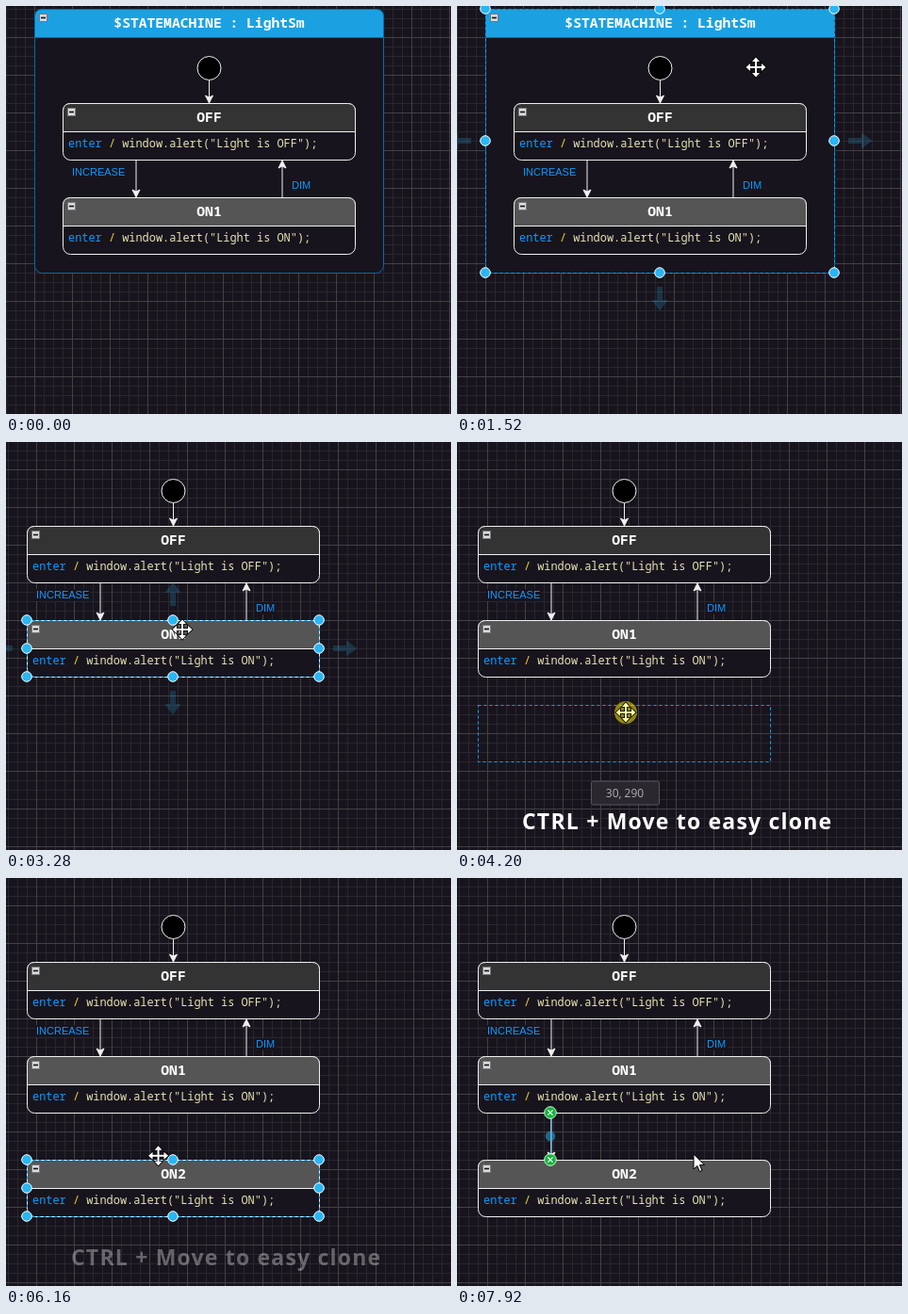
An HTML page for the animation above (8000 ms loop, 472 by 433 pixels).

```html
<!DOCTYPE html>
<html lang="en">
<head>
<meta charset="utf-8">
<title>State machine editor</title>
<style>
  html, body { margin: 0; width: 100%; height: 100%; overflow: hidden; background: #18141d; }
  svg { display: block; width: 472px; height: 433px; }
  text { white-space: pre; }
  .title { font: bold 14.67px "Noto Sans Mono", monospace; fill: #fff; text-anchor: middle; }
  .code { font: 11.92px "Noto Sans Mono", monospace; fill: #e6e3b4; }
  .event { font: 11px "Liberation Sans", sans-serif; fill: #0a9bff; }
  .hint { font: 12px "Open Sans", sans-serif; fill: #b0adb3; text-anchor: middle; }
  .caption { font: bold 23px "Open Sans", sans-serif; letter-spacing: 1.2px; fill: #fff; }
  .dash { fill: none; stroke: #00a8ff; stroke-dasharray: 3 3; }
  .glow { fill: none; stroke: #00a8ff; stroke-width: 5; opacity: .5; }
</style>
</head>
<body>
<svg id="stage" viewBox="0 0 472 433"></svg>
<script>
const LOOP = 8000, STEP = 40;
const BG = '#18141d', LINE = '#f0f0f0';
const SHIFT = [-38, -14];
const ON1 = [22, 189, 310, 60], ON2 = [22, 299, 310, 60], MACHINE = [30, 3, 370, 280];

// Pointer path: time, x, y
const PATH = [
  [480, 345, 400], [1200, 317, 65], [2400, 317, 65], [2840, 187, 199],
  [3720, 187, 199], [4200, 179, 287], [4320, 178, 294], [4640, 178, 294],
  [4680, 178, 296], [4960, 178, 296], [5080, 177, 306], [6000, 177, 306],
  [6560, 99, 249], [6720, 99, 249], [6880, 99, 285], [7000, 99, 301],
  [7440, 99, 301], [7920, 251, 293]
];

const box = ([x, y, w, h], attrs) =>
  `<rect x="${x + .5}" y="${y + .5}" width="${w}" height="${h}" ${attrs}/>`;

const foldIcon = (x, y) =>
  box([x, y, 8, 8], 'fill="#d9d9de" stroke="#77777c"') +
  `<path d="M${x + 2} ${y + 4.5}h5" stroke="#111" stroke-width="1.6"/>`;

// Rounded container with a 30 px header
function container([x, y, w, h], title, head, stroke) {
  const r = 8, top = `M${x + .5} ${y + 30.5}v${r - 30}q0 ${-r} ${r} ${-r}h${w - 2 * r}q${r} 0 ${r} ${r}v${30 - r}z`;
  return box([x, y, w, h], `rx="${r}" fill="${BG}" stroke="${stroke}"`) +
    `<path d="${top}" fill="${head}" stroke="${stroke}"/>` + foldIcon(x + 5, y + 5) +
    `<text class="title" x="${x + w / 2 + .5}" y="${y + 19.5}">${title}</text>`;
}

const state = (y, title, head, msg) =>
  container([60, y, 310, 60], title, head, LINE) +
  `<text class="code" x="66" y="${y + 47}"><tspan fill="#0a9bff">enter</tspan> ` +
  `<tspan fill="#e8dc2c">/</tspan> window.alert("${msg}");</text>`;

// Vertical arrow ending at y2
function arrow(x, y1, y2) {
  const s = Math.sign(y2 - y1);
  return `<path d="M${x} ${y1}V${y2 - 6 * s}M${x} ${y2}l-4 ${-8 * s}l4 ${2 * s}l4 ${-2 * s}z" fill="${LINE}" stroke="${LINE}"/>`;
}

const event = (x, y, w, name) =>
  `<rect x="${x - 1}" y="${y - 10}" width="${w}" height="13" fill="${BG}"/>` +
  `<text class="event" x="${x}" y="${y}">${name}</text>`;

function handles([x, y, w, h]) {
  let out = box([x, y, w, h], 'class="dash"');
  for (const i of [0, 1, 2]) for (const j of [0, 1, 2])
    if (i !== 1 || j !== 1)
      out += `<circle cx="${x + w * i / 2}" cy="${y + h * j / 2}" r="5.3" fill="#29b6f2" stroke="#fff"/>`;
  return out;
}

function hoverArrows([x, y, w, h]) {
  const cx = x + w / 2, cy = y + h / 2, gap = 15;
  return [[cx, y - gap, 0], [x + w + gap, cy, 90], [cx, y + h + gap, 180], [x - gap, cy, 270]]
    .map(([px, py, a]) => `<path transform="translate(${px} ${py}) rotate(${a})" ` +
      'd="M-3 0V-14H-8.5L0 -25.5L8.5 -14H3V0z" fill="#29b6f2" opacity=".2"/>').join('');
}

const endpoint = y =>
  `<circle cx="99" cy="${y}" r="6.3" fill="#12b53a" stroke="#d8f5de"/>` +
  `<path d="M96.4 ${y - 2.6}l5.2 5.2m0 -5.2l-5.2 5.2" stroke="#fff" stroke-width="1.3"/>`;

const gridLines = (p, color) => `<path d="M${p} 0V40M0 ${p}H40" stroke="${color}"/>`;

document.getElementById('stage').innerHTML = `
  <defs><pattern id="grid" width="40" height="40" patternUnits="userSpaceOnUse">
    ${[10.5, 20.5, 30.5].map(p => gridLines(p, '#29262e')).join('')}${gridLines(.5, '#424144')}
  </pattern></defs>
  <rect width="472" height="433" fill="${BG}"/>
  <rect width="472" height="433" fill="url(#grid)"/>
  <g id="machine">${container(MACHINE, '$STATEMACHINE : LightSm', '#1ba1e2', '#006eaf')}</g>
  <g id="diagram">
    <circle cx="215.5" cy="66" r="12.5" fill="#000" stroke="${LINE}"/>
    ${arrow(215.5, 79, 103)}
    ${state(103, 'OFF', '#333', 'Light is OFF')}
    ${state(203, 'ON1', '#555', 'Light is ON')}
    <g id="clone">${state(313, 'ON2', '#555', 'Light is ON')}</g>
    ${arrow(138, 164, 203)}${arrow(293, 203, 164)}
    ${event(70, 180, 59, 'INCREASE')}${event(303, 194, 23, 'DIM')}
  </g>
  <g id="machineHover">${hoverArrows(MACHINE)}</g>
  <g id="machineSel">${handles(MACHINE)}</g>
  <g id="on1Hover">${hoverArrows(ON1)}</g>
  <g id="on1Glow">${box(ON1, 'class="glow" rx="8"')}</g>
  <g id="on1Sel">${handles(ON1)}</g>
  <g id="on2Glow">${box(ON2, 'class="glow" rx="8"')}</g>
  <g id="edge"></g>
  <g id="on2Sel">${handles(ON2)}</g>
  <g id="edgeSel">
    <path d="M99.5 249V299" stroke="#5cc4ee"/>
    <circle cx="99" cy="274" r="5.3" fill="#29b6f2" opacity=".5"/>
    ${endpoint(249)}${endpoint(299)}
  </g>
  <g id="ghost">${box([22, 0, 310, 60], 'class="dash"')}</g>
  <g id="hint">${box([142, 0, 72, 25], 'rx="2" fill="#2a272f" stroke="#58555c"')}
    <text class="hint" id="hintText" x="178" y="17"></text></g>
  <text class="caption" id="caption" x="69" y="411">CTRL + Move to easy clone</text>
  <g id="pointer">
    <circle id="press" r="12" fill="#ffee00" opacity=".52"/>
    <path id="arrowShape" d="M0 0V16L3.8 12.5L6.4 18.5L9 17.4L6.4 11.6H11.5z" fill="#fff" stroke="#000"/>
    <path id="moveShape" d="M0 -10.5L4 -6H1V-1H6V-4L10.5 0L6 4V1H1V6H4L0 10.5L-4 6H-1V1H-6V4L-10.5 0L-6 -4V-1H-1V-6H-4z" stroke="#000" stroke-width="1.6" paint-order="stroke"/>
    <path id="crossShape" d="M0 -11V11M-11 0H11" stroke-width="1.7"/>
  </g>`;

const el = {};
document.querySelectorAll('[id]').forEach(n => el[n.id] = n);
const show = (id, on) => el[id].setAttribute('visibility', on ? 'visible' : 'hidden');
const move = (id, x, y) => el[id].setAttribute('transform', `translate(${x} ${y})`);
const clamp = v => Math.max(0, Math.min(1, v));

function pointerAt(t) {
  const i = PATH.findIndex(k => k[0] > t);
  if (i === 0) return PATH[0].slice(1);
  if (i < 0) return PATH[PATH.length - 1].slice(1);
  const [a, b] = [PATH[i - 1], PATH[i]];
  const u = (t - a[0]) / (b[0] - a[0]), e = u * u * (3 - 2 * u);
  return [a[1] + (b[1] - a[1]) * e, a[2] + (b[2] - a[2]) * e];
}

function render(ms) {
  const t = Math.floor(ms / STEP) * STEP;
  const during = (a, b) => t >= a && t < b;
  const [x, y] = pointerAt(t);
  const inside = t >= 2000;

  // Entering the group moves the view
  move('diagram', ...(inside ? SHIFT : [0, 0]));
  el.grid.setAttribute('x', inside ? 32 : 30);
  el.grid.setAttribute('y', inside ? 29 : 33);
  show('machine', !inside);
  show('machineHover', during(960, 2000));
  show('machineSel', during(1480, 2000));

  show('on1Glow', during(2640, 2720));
  show('on1Hover', during(3240, 3800) || during(6480, 6760));
  show('on1Sel', during(3240, 3800));

  // Clone drag, snapped to the 10 px grid
  const ghostY = 189 + Math.round((y - 199) / 10) * 10;
  const value = t < 4680 ? Math.min(290, ghostY + 11) : 300;
  const cloning = during(3800, 5680);
  show('ghost', cloning);
  show('hint', cloning);
  move('ghost', 0, ghostY);
  move('hint', 0, value + 70 - .5);
  el.hintText.textContent = `30, ${value}`;
  el.caption.setAttribute('opacity', Math.min(clamp((t - 3720) / 200), clamp((6240 - t) / 240)));

  show('clone', t >= 5680);
  show('on2Sel', during(5680, 7480));

  // New transition
  const tip = y > 293 || t >= 7000 ? 299 : y - 6;
  el.edge.innerHTML = t >= 6800 && tip > 256 ? arrow(100, 250, tip) : '';
  show('on2Glow', during(6960, 7480));
  show('edgeSel', t >= 7520);

  const pressed = during(1440, 1520) || during(3200, 3280) || during(3760, 5680) || during(6760, 7480);
  const cross = during(6480, 7520);
  const moving = !cross && (during(520, 2000) && y < 283 || during(2640, 6200));
  show('pointer', true);
  move('pointer', x, y);
  show('press', pressed);
  show('moveShape', moving);
  show('crossShape', cross);
  show('arrowShape', t >= 520 && !moving && !cross);
  const tint = pressed ? '#ffffa0' : '#fff';
  el.moveShape.setAttribute('fill', tint);
  el.crossShape.setAttribute('stroke', tint);
}

function tick(now) {
  render(now % LOOP);
  requestAnimationFrame(tick);
}
render(0);
requestAnimationFrame(tick);
</script>
</body>
</html>
```
